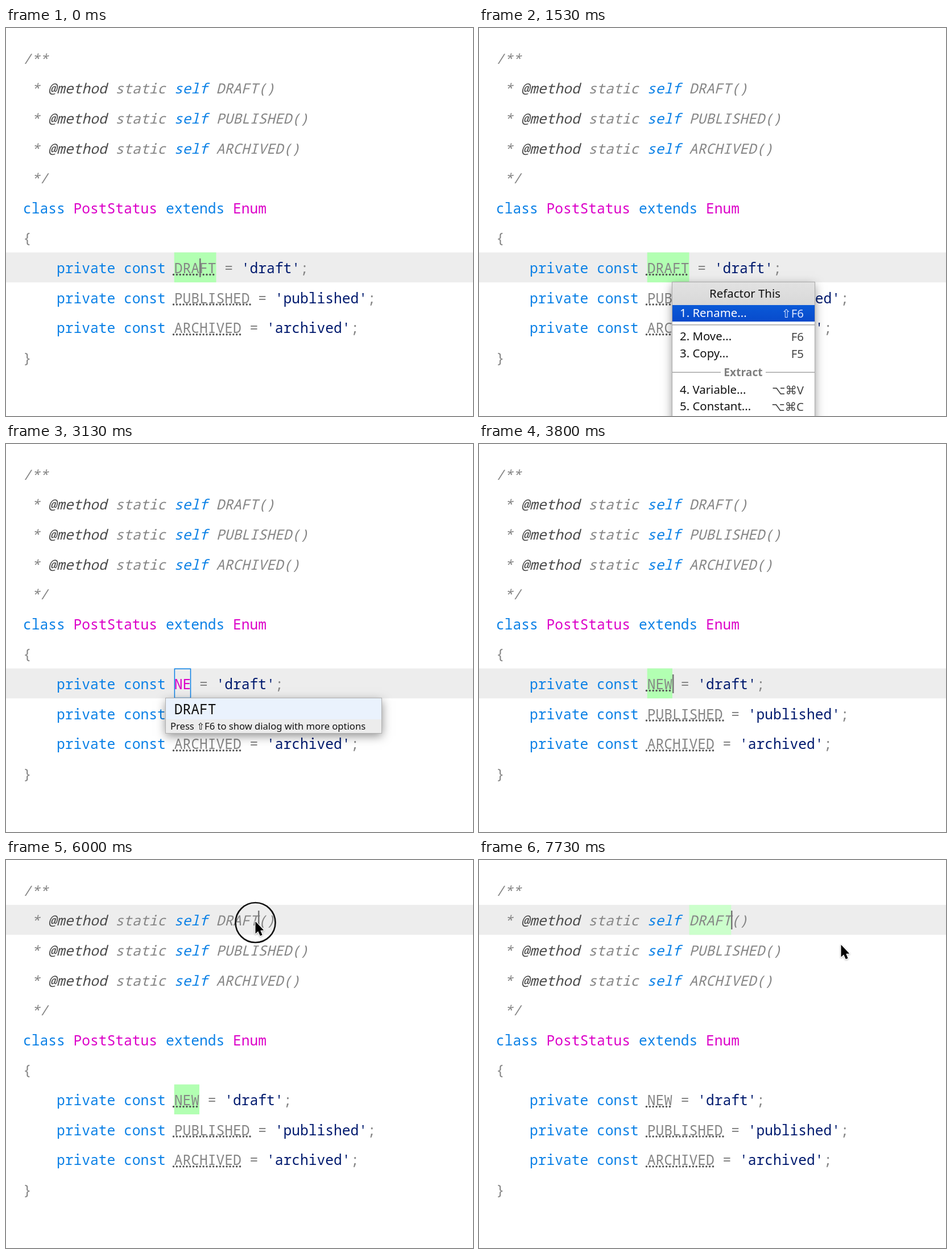
Recreate the animation shown at these times as an HTML page with a canvas. Size 821 by 682 pixels, loop 7.79 s.

```html
<!DOCTYPE html>
<html lang="en">
<head>
<meta charset="utf-8">
<title>Rename a constant</title>
<style>
  html, body { margin: 0; width: 100%; height: 100%; overflow: hidden; background: #fff; }
  canvas { display: block; }
</style>
</head>
<body>
<canvas id="stage" width="821" height="682"></canvas>
<script>
const LOOP = 7790;
const W = 821, H = 682;
const LEFT = 30, CELL = 14.76, TOP = 26.3, ROW = 52.6;
const MONO = '"Noto Sans Mono", "DejaVu Sans Mono", monospace';
const SANS = '"Noto Sans", "Open Sans", "DejaVu Sans", sans-serif';
const CODE = '24.6px ' + MONO;
const ITEM = '500 20.4px ' + SANS;

const GREY = '#868686', DARK = '#4a4a4a', BLUE = '#0a80e6';
const PINK = '#dc00c8', NAVY = '#001a6e', BAND = '#ededed';
const GREEN = '#b2ffb2', PALE = '#ccffcc';

// Moments in ms
const MENU = 700, PICK = 1600, POPUP = 1670;
const KEYS = [2870, 3030, 3200], ENTER = 3530;
const CLICK = 5870, RELEASE = 6130, MARK = 6270;
const BLINK = 500, BLINK_START = 3590;

// Pointer path: time, x, y
const PATH = [
  [5200, 828, 292], [5600, 502.5, 140], [5840, 438, 107],
  [6470, 438, 107], [7130, 636, 148]
];

const ctx = document.getElementById('stage').getContext('2d');
const colX = col => LEFT + col * CELL;
const rowY = row => TOP + row * ROW;

function rect(x, y, w, h, color) {
  ctx.fillStyle = color;
  ctx.fillRect(x, y, w, h);
}

function text(str, x, y, color, font, align = 'left') {
  ctx.font = font;
  ctx.textAlign = align;
  ctx.fillStyle = color;
  ctx.fillText(str, x, y);
}

// Draws [string, colour] pairs one after another on the character grid
function code(row, col, parts, slant = '') {
  for (const [str, color] of parts) {
    text(str, colX(col), rowY(row) + 36.4, color, slant + CODE);
    col += str.length;
  }
}

function cellBand(row, col, count, color) {
  rect(colX(col), rowY(row), count * CELL, ROW, color);
}

function dots(row, count) {
  const y = rowY(row) + 39;
  const end = colX(18 + count) + 1;
  ctx.fillStyle = '#555';
  for (let x = colX(18) - 1.2; x < end; x += 5.85) {
    ctx.beginPath();
    ctx.arc(x, y, 1.75, 0, Math.PI * 2);
    ctx.fill();
  }
}

function caret(row, col) {
  rect(Math.round(colX(col)), Math.round(rowY(row) + 10), 2.5, 33, '#777');
}

function panel(x, y, w, h) {
  ctx.save();
  ctx.shadowColor = 'rgba(0,0,0,.45)';
  ctx.shadowBlur = 16;
  ctx.shadowOffsetY = 5;
  rect(x, y, w, h, '#fff');
  ctx.restore();
}

function frame(x, y, w, h, color, width) {
  ctx.strokeStyle = color;
  ctx.lineWidth = width;
  ctx.strokeRect(x, y, w, h);
}

function shade(y, h, from, to) {
  const g = ctx.createLinearGradient(0, y, 0, y + h);
  g.addColorStop(0, from);
  g.addColorStop(1, to);
  return g;
}

function menuItem(label, keys, y, color = '#111', keyColor = '#444') {
  text(label, 353, y, color, ITEM);
  text(keys, 571, y + 1, keyColor, ITEM, 'right');
}

function drawMenu() {
  panel(340, 447, 250, 260);
  rect(340, 447, 250, 40, shade(447, 40, '#e2e2e2', '#d8d8d8'));
  text('Refactor This', 467.5, 473.5, '#111', ITEM, 'center');
  rect(340, 487, 250, 29, shade(487, 29, '#0a5ad8', '#084acb'));
  menuItem('1. Rename...', '⇧F6', 508, '#fff', '#dce6ff');
  rect(340, 521, 250, 1.5, '#a6a6a6');
  menuItem('2. Move...', 'F6', 549);
  menuItem('3. Copy...', 'F5', 579);
  rect(340, 604.5, 85, 1.5, '#a6a6a6');
  rect(504, 604.5, 86, 1.5, '#a6a6a6');
  text('Extract', 464.5, 611.5, '#808080', 'bold 19.2px ' + SANS, 'center');
  menuItem('4. Variable...', '⌥⌘V', 643);
  menuItem('5. Constant...', '⌥⌘C', 672);
  frame(339.5, 446.5, 251, 262, '#a8a8a8', 1);
}

function drawPopup() {
  panel(281, 447, 380, 61);
  rect(281, 447, 380, 37, '#eaf2fd');
  rect(281, 484, 380, 24, '#ececec');
  text('DRAFT', colX(18), 475, '#111', CODE);
  text('Press ⇧F6 to show dialog with more options', 289, 501.5, '#111', '500 16.6px ' + SANS);
  frame(280.5, 446.5, 380, 62, '#b0b0b0', 1);
}

function pointerAt(t) {
  if (t < PATH[0][0]) return null;
  let i = 0;
  while (i < PATH.length - 2 && t > PATH[i + 1][0]) i++;
  const [t0, x0, y0] = PATH[i], [t1, x1, y1] = PATH[i + 1];
  const p = Math.min(1, (t - t0) / (t1 - t0));
  const ease = i === 3 ? p * p * (3 - 2 * p) : 1 - (1 - p) ** 1.6;
  return [x0 + (x1 - x0) * ease, y0 + (y1 - y0) * ease];
}

function drawPointer(t) {
  const at = pointerAt(t);
  if (!at) return;
  if (t >= CLICK && t < RELEASE) {
    ctx.beginPath();
    ctx.arc(438.5, 110, 35, 0, Math.PI * 2);
    ctx.strokeStyle = '#111';
    ctx.lineWidth = 2.6;
    ctx.stroke();
  }
  ctx.save();
  ctx.translate(...at);
  ctx.beginPath();
  [[0.5, 1], [0.5, 22.5], [5.2, 18.2], [8.8, 26.3], [12.6, 24.7], [9.2, 16.8], [15.2, 16.6]]
    .forEach(([x, y]) => ctx.lineTo(x, y));
  ctx.closePath();
  ctx.shadowColor = 'rgba(0,0,0,.3)';
  ctx.shadowBlur = 3;
  ctx.shadowOffsetY = 1;
  ctx.strokeStyle = '#fff';
  ctx.lineWidth = 2.4;
  ctx.lineJoin = 'round';
  ctx.stroke();
  ctx.shadowColor = 'transparent';
  ctx.fillStyle = '#000';
  ctx.fill();
  ctx.restore();
}

function constant(row, name, value, color = GREY) {
  code(row, 4, [['private const ', BLUE], [name, color], [' = ', GREY], [`'${value}'`, NAVY], [';', GREY]]);
}

function drawCode(t) {
  const typed = KEYS.filter(k => t >= k).length;
  const name = typed ? 'NEW'.slice(0, typed) : 'DRAFT';
  const renaming = t >= PICK && t < ENTER;
  const clicked = t >= CLICK;
  const marked = t >= MARK;

  rect(0, rowY(clicked ? 1 : 7), W, ROW, BAND);
  if (marked) cellBand(1, 23, 5, PALE);
  else if (!renaming) cellBand(7, 18, name.length, GREEN);
  else if (!typed) cellBand(7, 18, name.length, '#d9d9d9');

  code(0, 0, [['/**', GREY]], 'italic ');
  ['DRAFT', 'PUBLISHED', 'ARCHIVED'].forEach((label, i) => code(i + 1, 0, [
    [' * ', GREY], ['@method', DARK], [' static ', GREY], ['self', BLUE], [` ${label}()`, GREY]
  ], 'italic '));
  code(4, 0, [[' */', GREY]], 'italic ');
  code(5, 0, [['class ', BLUE], ['PostStatus', PINK], [' extends ', BLUE], ['Enum', PINK]]);
  code(6, 0, [['{', GREY]]);
  constant(7, name, 'draft', renaming ? PINK : GREY);
  constant(8, 'PUBLISHED', 'published');
  constant(9, 'ARCHIVED', 'archived');
  code(10, 0, [['}', GREY]]);

  if (renaming) frame(colX(18) + 0.7, rowY(7) + 0.7, name.length * CELL - 1.4, ROW - 1.4, BLUE, 1.5);
  else dots(7, name.length);
  dots(8, 9);
  dots(9, 8);

  const lit = Math.floor((t - BLINK_START) / BLINK) % 2 === 0;
  const menuOpen = t >= MENU && t < PICK;
  if (lit && !menuOpen && !(renaming && !typed)) {
    if (clicked) caret(1, 28);
    else caret(7, 18 + (typed || 3));
  }
}

function draw(t) {
  rect(0, 0, W, H, '#fff');
  drawCode(t);
  if (t >= MENU && t < PICK) drawMenu();
  if (t >= POPUP && t < ENTER) drawPopup();
  drawPointer(t);
}

function tick() {
  draw(performance.now() % LOOP);
  requestAnimationFrame(tick);
}
tick();
</script>
</body>
</html>
```
